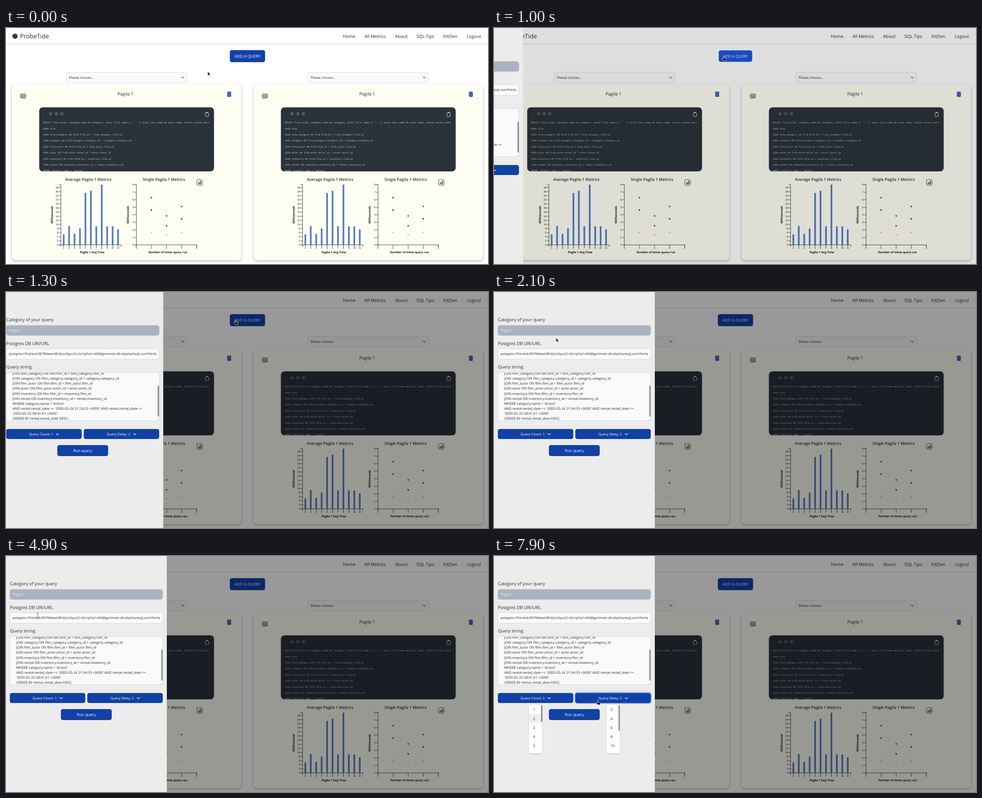
Recreate the animation shown at these times as an HTML page. Size 1067 by 525 pixels, loop 8000 ms.

```html
<!DOCTYPE html>
<html lang="en">
<head>
<meta charset="utf-8">
<title>Query dashboard</title>
<style>
html, body { margin: 0; width: 100%; height: 100%; overflow: hidden; background: #fff; }
svg { display: block; width: 1067px; height: 525px; }
text { font-family: "Open Sans", "Noto Sans", sans-serif; text-rendering: geometricPrecision; fill: #2b2b2b; white-space: pre; }
.mid { text-anchor: middle; }
.end { text-anchor: end; }
.w5 { font-weight: 500; }
.w6 { font-weight: 600; }
.w7 { font-weight: 700; fill: #111; }
.white { fill: #fff; }
.tick { font-family: "Liberation Sans", Arial, sans-serif; font-size: 5.5px; fill: #111; }
.code { font-family: "Liberation Mono", monospace; font-size: 5.02px; fill: #cdd1d6; }
</style>
</head>
<body>
<svg id="stage" viewBox="0 0 1067 525">
  <defs>
    <filter id="cardShade" x="-5%" y="-5%" width="110%" height="112%">
      <feDropShadow dx="0" dy="2" stdDeviation="2.4" flood-opacity=".32"/>
    </filter>
    <filter id="menuShade" x="-30%" y="-10%" width="160%" height="125%">
      <feDropShadow dx="0" dy="1.5" stdDeviation="1.8" flood-opacity=".18"/>
    </filter>
    <clipPath id="codeClip"><rect x="73.5" y="176.5" width="387" height="142.5" rx="8"/></clipPath>
    <clipPath id="uriClip"><rect x="14" y="127" width="327" height="22"/></clipPath>
    <clipPath id="areaClip"><rect x="9" y="179.5" width="337.5" height="106.5"/></clipPath>
  </defs>
</svg>
<script>
const LOOP = 8000, STEP = 100;
const BLUE = '#1140a6', HOVER = '#1d56d8';
const PANEL_WIDTH = 356, CARD_GAP = 535;

const text = (s, x, y, size, cls = '', extra = '') =>
  `<text x="${x}" y="${y}" font-size="${size}" class="${cls}" ${extra}>${
    s.replace(/</g, '&lt;').replace(/>/g, '&gt;')}</text>`;
const rect = (x, y, w, h, fill, rx = 0, extra = '') =>
  `<rect x="${x}" y="${y}" width="${w}" height="${h}" fill="${fill}" rx="${rx}" ${extra}/>`;
const line = (d, stroke = '#111', width = .75) =>
  `<path d="${d}" fill="none" stroke="${stroke}" stroke-width="${width}" stroke-linecap="round" stroke-linejoin="round"/>`;
const chevron = (x, y, stroke) => line(`M${x - 3} ${y - 1.4}l3 3 3-3`, stroke, 1.1);
const dot = (x, y, r, fill) => `<circle cx="${x}" cy="${y}" r="${r}" fill="${fill}"/>`;
const range = n => Array.from({ length: n }, (_, i) => i);

const joins = [
  'JOIN film_category ON film.film_id = film_category.film_id',
  'JOIN category ON film_category.category_id = category.category_id',
  'JOIN film_actor ON film.film_id = film_actor.film_id',
  'JOIN actor ON film_actor.actor_id = actor.actor_id',
  'JOIN inventory ON film.film_id = inventory.film_id',
  'JOIN rental ON inventory.inventory_id = rental.inventory_id',
  "WHERE category.name = 'Action'"
];
const shownCode = [
  "SELECT film.title, category.name AS category, actor.first_name || ' ' || actor.last_name AS actor_name, rental.rental_date",
  'FROM film', ...joins
];
const typedQuery = [
  ...joins,
  "AND rental.rental_date >= '2005-05-24 21:54:33 +0000' AND rental.rental_date <=",
  "'2005-05-25 08:41:01 +0000'",
  'ORDER BY rental.rental_date DESC;'
];

function axes(x0, yCount, yStep, yUnit, xTicks) {
  const top = 348.5, base = 482.5, right = x0 + 133.6;
  let out = line(`M${x0 - 4} ${top}H${x0}V${base}H${x0 - 4}M${x0} ${base + 4}V${base}H${right}v4`);
  for (const i of range(yCount)) {
    const y = base - i * yStep;
    out += line(`M${x0 - 4} ${y}H${x0}`) + text(String(i * yUnit), x0 - 5.5, y + 1.9, 5.5, 'tick end');
  }
  for (const [label, x] of xTicks)
    out += line(`M${x} ${base}v4`) + text(String(label), x, 491, 5.5, 'tick mid');
  return out;
}

const sideways = (x) =>
  text('Milliseconds', 0, 0, 6.35, 'w7 mid', `transform="translate(${x} 415.3) rotate(-90)"`);

function barChart() {
  const values = [5.1, 9.2, 5.4, 8, 25.3, 26.4, 9, 29.37, 9, 9, 7.55];
  const xAt = i => 127.6 + i * 12.05;
  const bars = values.map((v, i) =>
    rect(xAt(i) - 1.9, 482.3 - v * 4.56, 3.8, v * 4.56, '#597ec4')).join('');
  return text('Average Pagila 1 Metrics', 182.4, 340.2, 8.75, 'w6 mid') + bars +
    axes(121.5, 15, 9.12, 2, values.map((_, i) => [i + 1, xAt(i)])) +
    sideways(104.3) + text('Pagila 1 Avg Time', 190.6, 501.2, 6.3, 'w7 mid');
}

function dotChart() {
  const xAt = i => 288.5 + i * 33.4;
  const series = [
    ['#0b810b', 377.6, 418, 397.1],
    [BLUE, 405, 440, 424.6],
    ['#efcd17', 454.8, 460, 454.5]
  ];
  const dots = series.map(([c, ...ys]) =>
    ys.map((y, i) => dot(xAt(i + 1), y, 1.75, c)).join('')).join('');
  return text('Single Pagila 1 Metrics', 349.6, 340.2, 8.75, 'w6 mid') +
    axes(288.5, 9, 16.75, 1, range(5).map(i => [i, xAt(i)])) + dots +
    sideways(271.8) + text('Number of times query run', 358.2, 501.2, 6.3, 'w7 mid');
}

function card() {
  const select = rect(133.5, 98.5, 267, 23, '#f9fafb', 4, 'stroke="#d1d5db" stroke-width=".8"') +
    text('Please choose...', 139.3, 112.7, 7.45) + chevron(391, 110, '#555');
  const grid = rect(32.5, 146.8, 11, 9, 'none', 1, 'stroke="#222"') +
    line('M32.5 149.5h11M32.5 152.6h11M36.2 149.5v6.3M39.9 149.5v6.3', '#222', .8);
  const trash = `<path d="M489 142.3h3l.8-1h2.4l.8 1h3v1.5h-10zM489.8 144.6h8.5v7q0 1.3-1.3 1.3h-5.9q-1.3 0-1.3-1.3z" fill="${BLUE}"/>` +
    line('M492.2 146.3v4.8M495.9 146.3v4.8', '#fffff4', .8);
  const clip = rect(441.3, 188.4, 7.2, 8.4, 'none', 1, 'stroke="#e8eaec" stroke-width=".9"') +
    rect(443.2, 187, 3.4, 2.3, '#e8eaec', .7);
  const code = rect(73.5, 176.5, 387, 142.5, '#2a323c', 8) +
    [98.4, 111, 123.6].map(x => dot(x, 190.8, 3.5, '#555c65')).join('') + clip +
    `<g clip-path="url(#codeClip)">${shownCode.map((s, i) =>
      text(s, 82, 212.1 + i * 13.4, 5.02, 'code')).join('')}</g>`;
  const chartIcon = rect(422.3, 337.3, 12.6, 12.6, 'none', 3.5, 'stroke="#222" stroke-width=".9"') +
    line('M426 344.5v2.6M428.7 342.7v4.4M431.4 340.6v6.5', '#222', 1.5);
  return select + rect(13, 126.3, 508, 390, '#fffff4', 7, 'filter="url(#cardShade)"') +
    grid + text('Pagila 1', 264.6, 150.4, 9.8, 'mid') + trash + code +
    barChart() + dotChart() + chartIcon;
}

function header() {
  const links = [['Home', 759.5], ['All Metrics', 817], ['About', 875],
    ['SQL Tips', 928.3], ['KitDen', 983.7], ['Logout', 1035.7]];
  return rect(0, 0, 1067, 35.5, '#fff') + line('M0 35.7H1067', '#d3d3d3', 1) +
    dot(20, 18.3, 5.8, '#383838') + text('ProbeTide', 31, 23.2, 13.5, 'w5') +
    links.map(([s, x]) => text(s, x, 21.8, 9.9, 'mid')).join('');
}

function menu(x, items, thumb, id) {
  return `<g id="${id}">` +
    rect(x, 331.7, 29.5, 107, '#fff', 4, 'filter="url(#menuShade)"') +
    rect(x, 351.2, 26.6, 20.2, '#ededed', 0, 'class="mark" opacity="0"') +
    items.map((s, i) => text(s, x + 8.9, 344.4 + i * 20.1, 7.9)).join('') +
    rect(x + 26.6, 332.3, 2.9, thumb, '#8b8b8b', 1) + '</g>';
}

function panel() {
  const field = (y, h, fill, stroke) =>
    rect(8.5, y, 338.5, h, fill, 5, `stroke="${stroke}" stroke-width=".8"`);
  const label = (s, y) => text(s, 8.5, y, 9.75, 'w5');
  const button = (x, w, y, h) => rect(x, y, w, h, BLUE, 4.5);
  const ring = (x, id) =>
    rect(x - 1, 303.5, 169, 24.5, 'none', 5.5, `id="${id}" stroke="#8db1f6" stroke-width="2"`);
  const user = 'fntrlesk';
  const uri = `postgres://${user}:RkTB4ewm8hQvzzGpccD-LbrUyFa3-nK6@gommen.db.elephantsql.com/${user}`;
  return rect(0, 0, PANEL_WIDTH, 525, '#ececec') +
    label('Category of your query', 65) + field(74.2, 22.6, '#aab3c1', '#b9c0cb') +
    text('Pagila 1', 14.5, 88.1, 7.6, '', 'style="fill:#eef1f5"') +
    label('Postgres DB URI/URL', 117.6) + field(126.4, 23, '#f9fafb', '#d1d5db') +
    `<g clip-path="url(#uriClip)">${text(uri, 14.5, 140.4, 7.3)}</g>` +
    label('Query string', 170.2) + field(179.2, 107.2, '#f9fafb', '#d1d5db') +
    `<g clip-path="url(#areaClip)">${typedQuery.map((s, i) =>
      text(s, 22.5, 184 + i * 11.15, 7.65)).join('')}</g>` +
    rect(343.8, 208, 2.9, 69, '#888', 1) + line('M342.5 285l3-3M344.5 285l1-1', '#999', .5) +
    ring(8.5, 'countRing') + button(8.5, 167, 304.7, 22.3) +
    text('Query Count: 1', 58.6, 318.7, 7.6, 'w5 white', 'id="countText"') + chevron(122, 316.2, '#fff') +
    ring(180, 'delayRing') + button(180, 167, 304.7, 22.3) +
    text('Query Delay: 2', 231, 318.7, 7.6, 'w5 white') + chevron(293, 316.2, '#fff') +
    button(121.5, 112.5, 340.5, 24.4) + text('Run query', 177.8, 355.9, 8.75, 'w5 mid white') +
    menu(77.5, ['1', '2', '3', '4', '5'], 37, 'countMenu') +
    menu(249, ['2', '4', '6', '8', '10'], 56.5, 'delayMenu');
}

const pointers = {
  arrow: '<path d="M0 0V8.8L2 7 3.4 10 4.8 9.4 3.5 6.5H6.2Z" fill="#111" stroke="#fff" stroke-width=".6"/>',
  hand: '<path d="M-1 1a1 1 0 0 1 2 0V4.2l4 .9q1.2.3 1 1.5L5.4 10H.3L-3 6.3c-.7-.9.5-1.7 1.3-1l.7.6z" fill="#151515" stroke="#fff" stroke-width=".7"/>',
  beam: line('M-2-5.4Q0-5.4 0-4V4Q0 5.4-2 5.4M2-5.4Q0-5.4 0-4M0 4Q0 5.4 2 5.4', '#444', .8)
};

const stage = document.getElementById('stage');
stage.insertAdjacentHTML('beforeend',
  header() +
  `<g id="add">${rect(495.5, 49.2, 78, 26.8, BLUE, 4.5, 'id="addFace"')}${
    text('ADD A QUERY', 534.6, 66, 8.95, 'w5 mid white')}</g>` +
  `<g>${card()}</g><g transform="translate(${CARD_GAP})">${card()}</g>` +
  rect(0, 0, 1067, 525, '#000', 0, 'id="shade"') +
  `<g id="panel">${panel()}</g><g id="pointer">${
    Object.entries(pointers).map(([k, s]) => `<g id="${k}">${s}</g>`).join('')}</g>`);

const $ = id => document.getElementById(id);
const show = (id, on) => $(id).setAttribute('visibility', on ? 'visible' : 'hidden');
const clamp = v => Math.max(0, Math.min(1, v));

// time, x, y of the pointer's hot spot
const path = [
  [0, 446.5, 97], [100, 446.5, 97], [800, 507, 63], [1000, 508.3, 62.8], [1300, 508, 62.3],
  [1900, 171, 106], [2400, 75.5, 95.5], [2700, 75.5, 95.5], [2800, 73.2, 92], [3300, 73, 92.5],
  [3700, 75.2, 122], [3800, 75.2, 122], [4000, 70.3, 131.3], [4900, 70.3, 131.6],
  [5500, 89.5, 200], [5900, 89.5, 200], [6600, 125.5, 321], [6700, 122, 324],
  [6800, 89, 354], [7000, 88.5, 354.5], [7700, 229.5, 321], [8000, 229.5, 321]
];

function pointerAt(t) {
  const i = path.findIndex(p => p[0] > t);
  const [t0, x0, y0] = path[i - 1], [t1, x1, y1] = path[i];
  const u = (t - t0) / (t1 - t0), e = u * u * (3 - 2 * u);
  return [x0 + (x1 - x0) * e, y0 + (y1 - y0) * e];
}

const inside = (x, y, l, t, r, b) => x >= l && x <= r && y >= t && y <= b;
const overAdd = (x, y) => inside(x, y, 496, 49, 573, 76);

function pointerKind(x, y, t) {
  if (t < 1400) return overAdd(x, y) ? 'hand' : 'arrow';
  const fields = [[74, 97], [126, 150], [179, 287]];
  if (fields.some(([a, b]) => inside(x, y, 8, a, 347, b))) return 'beam';
  const targets = [[8, 304, 176, 327], [180, 304, 347, 327], [121, 340, 234, 365]];
  if (t >= 6700) targets.push([77, 331, 107, 439]);
  return targets.some(r => inside(x, y, ...r)) ? 'hand' : 'arrow';
}

// under-damped spring, 1 at rest outside and 0 when settled
function springLeft(s) {
  if (s <= 0) return 1;
  const decay = 12.5, freq = Math.sqrt(180 - decay * decay);
  return Math.exp(-decay * s) * (Math.cos(freq * s) + decay / freq * Math.sin(freq * s));
}

function draw(t) {
  const since = t - 946;
  const left = t >= 2000 ? 0 : springLeft(since / 1000 * 1.045);
  $('panel').setAttribute('transform', `translate(${-PANEL_WIDTH * left})`);
  show('panel', since > 0);
  $('shade').setAttribute('opacity', .4 * clamp(since / 165));

  const [x, y] = pointerAt(t), kind = pointerKind(x, y, t);
  $('pointer').setAttribute('transform', `translate(${x} ${y})`);
  for (const k in pointers) show(k, k === kind);

  const hover = t <= 1000 && overAdd(x, y);
  $('addFace').setAttribute('fill', hover ? HOVER : BLUE);
  $('add').setAttribute('transform',
    hover ? 'translate(534.5 62.6) scale(.95) translate(-534.5 -62.6)' : '');

  show('countRing', t >= 6700 && t < 7000);
  show('countMenu', t >= 6700);
  $('countMenu').querySelector('.mark').setAttribute('opacity', t >= 6800 ? 1 : 0);
  $('countText').textContent = `Query Count: ${t >= 7000 ? 2 : 1}`;
  show('delayRing', t >= 7800);
  show('delayMenu', t >= 7800);
}

const start = performance.now();
function tick() {
  const t = (performance.now() - start) % LOOP;
  draw(Math.floor(t / STEP) * STEP);
  requestAnimationFrame(tick);
}
tick();
</script>
</body>
</html>
```
